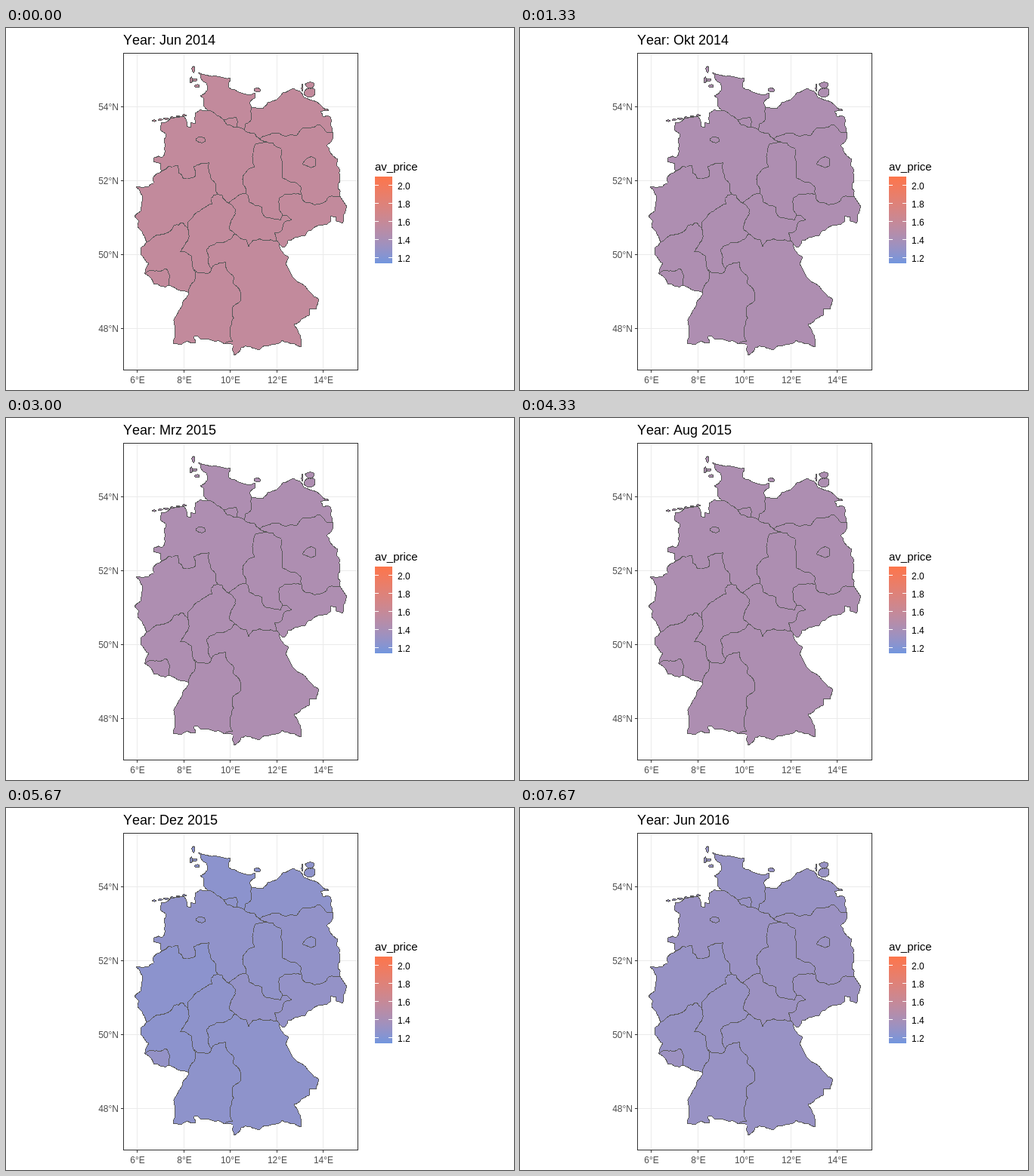
These frames come from a looping animation (672 px wide and 480 px high, 8000 ms). An HTML page:

```html
<!DOCTYPE html>
<html lang="en">
<head>
<meta charset="utf-8">
<title>Average price map</title>
<style>
  html, body { margin: 0; width: 100%; height: 100%; overflow: hidden; background: #fff; }
  svg { display: block; width: 672px; height: 480px; }
  text { font-family: "Liberation Sans", Arial, sans-serif; font-kerning: none; }
  .axis { font-size: 12px; fill: #4d4d4d; }
  .key { font-size: 12px; }
  .map { stroke: #595959; stroke-linejoin: round; }
  .map, .lines { shape-rendering: crispEdges; }
</style>
</head>
<body>
<svg id="stage" viewBox="0 0 672 480"></svg>
<script>
// Key points of each border between two junctions; ripple() roughens the stretches between them.
const arcs = {
  shW: '254,59 258,67 265,73 267,82 257,90 262,94 262,104 267,109',
  shN: '254,59 279,64 297,66 295,79 303,82 318,88 330,86 329,93 322,99 325,106',
  shNi: '267,109 277,114 288,122',
  shHh: '288,122 296,119 304,118 305,132',
  hhNi: '288,122 292,128 305,132',
  shNiE: '305,132 315,135',
  shMv: '325,106 325,121 317,127 315,135',
  mvN: '325,106 340,107 346,99 358,95 367,85 380,80 389,84 394,92 411,98 418,104 427,109 416,111 419,117 429,118 432,138',
  mvNi: '315,135 328,139 336,148',
  mvBb: '336,148 358,139 372,143 385,142 396,132 412,128 419,132 427,139 432,138',
  niBb: '336,148 345,151',
  bbE: '432,138 432,147 424,156 428,163 439,174 437,182 442,196 439,210 442,223',
  bbSt: '345,151 353,152 364,160 364,173 366,199 383,205 391,212 391,221',
  bbSn: '391,221 396,231 419,232 427,224 442,223',
  snE: '442,223 451,237 445,259 437,256 437,251 430,249 429,257 406,266 396,275 379,280 373,282 367,291 361,285',
  snBy: '357,282 361,285',
  stSn: '391,221 371,220 362,225 362,242 366,248',
  thSn: '366,248 378,254 367,260 365,268 355,272 357,282',
  stTh: '366,248 363,255 342,250 339,238 322,231 318,220',
  niTh: '318,220 305,224 294,232',
  niSt: '345,151 330,154 327,166 329,184 316,193 314,208 318,220',
  heNi: '280,220 286,222 294,232',
  heTh: '294,232 304,241 300,252 295,266 303,273',
  thBy: '303,273 318,281 321,290 327,281 344,281 357,282',
  heBy: '303,273 284,284 265,294 267,308 272,319',
  bwBy: '272,319 276,314 290,310 292,320 300,328 300,338 310,350 310,362 299,373 297,396 300,415 289,419',
  heBw: '248,320 257,325 267,326 272,319',
  rpBw: '248,320 249,336 242,351',
  rpHe: '240,265 241,280 230,297 245,302 248,320',
  rpNw: '186,284 200,274 212,272 222,262 234,258 240,265',
  heNw: '240,265 240,258 256,243 273,233 271,226 280,220',
  nwNi: '206,190 227,182 235,200 251,196 248,184 269,178 270,194 277,206 280,220',
  slRp: '184,326 192,321 212,319 216,332 216,341',
  byE: '361,285 366,297 374,304 370,313 379,330 394,341 402,350 414,360 411,373 402,372 401,381 381,393 389,407 391,415 390,423 382,419 365,414',
  byS: '365,414 361,418 342,421 335,427 323,422 311,424 302,434 300,420 289,419',
  bwS: '289,419 272,414 258,413 253,408 248,410 251,417 232,420 221,418 223,402 222,392 229,374 236,360 242,351',
  rpS: '242,351 227,347 216,341',
  slW: '216,341 206,343 196,340 184,326',
  rpW: '184,326 189,312 178,300 178,292 186,284',
  nwW: '186,284 180,270 174,263 176,256 170,249 178,243 180,230 172,211 188,211 195,206 194,200 206,190',
  niW: '206,190 205,180 195,178 196,172 207,171 211,155 211,140 205,136 205,126 222,119 236,118 239,130 244,132 245,125 251,127 250,113 256,109 267,109'
};

// A leading minus walks the arc backwards.
const states = {
  SH: 'shN shMv -shNiE -shHh -shNi -shW',
  HH: 'shHh -hhNi',
  MV: 'mvN -mvBb -mvNi -shMv',
  NI: 'niW shNi hhNi shNiE mvNi niBb niSt niTh -heNi -nwNi',
  BB: 'mvBb bbE -bbSn -bbSt -niBb',
  ST: 'bbSt stSn stTh -niSt',
  SN: 'bbSn snE -snBy -thSn -stSn',
  TH: 'stTh niTh heTh thBy -thSn',
  HE: 'heNi heTh heBy -heBw -rpHe heNw',
  NW: 'nwW nwNi -heNw -rpNw',
  RP: 'rpW rpNw rpHe rpBw rpS -slRp',
  SL: 'slW slRp',
  BW: 'heBw bwBy bwS -rpBw',
  BY: 'thBy snBy byE byS -bwBy -heBy'
};

// Small areas as rough ovals: centre and radii.
const ovals = {
  SH: [[248, 55, 2, 4], [250, 69, 3, 2], [245, 69, 2, 4], [253, 77, 3, 2], [332, 82, 5, 3]],
  MV: [[402, 76, 6, 4], [402, 86, 8, 6], [392, 79, 1, 4]],
  NI: Array.from({ length: 6 }, (_, i) => [196 + 8 * i, 123 - 1.4 * i, 3, 1]),
  HB: [[258, 148, 7, 4]],
  BE: [[402, 178, 9, 7]]
};

let seed = 7;
const random = () => (seed = seed * 16807 % 2147483647) / 2147483647;

// Midpoint displacement until the pieces are about three pixels long.
function ripple([x1, y1], [x2, y2]) {
  const [dx, dy] = [x2 - x1, y2 - y1];
  if (Math.hypot(dx, dy) < 5) return [[x2, y2]];
  const k = (random() - .5) * .3;
  const mid = [(x1 + x2) / 2 - dy * k, (y1 + y2) / 2 + dx * k];
  return [...ripple([x1, y1], mid), ...ripple(mid, [x2, y2])];
}

for (const name in arcs) {
  const keys = arcs[name].split(' ').map(p => p.split(',').map(Number));
  arcs[name] = keys.flatMap((p, i) => i ? ripple(keys[i - 1], p) : [p]);
}

const ring = pts => 'M' + pts.join('L') + 'Z';

const outline = list => ring(list.split(' ').flatMap(name =>
  name[0] === '-' ? [...arcs[name.slice(1)]].reverse() : arcs[name]));

const oval = ([x, y, rx, ry]) => ring(Array.from({ length: 9 }, (_, i) => {
  const [a, r] = [i * Math.PI * 2 / 9, .8 + random() * .4];
  return [x + rx * r * Math.cos(a), y + ry * r * Math.sin(a)];
}));

const shape = id => `<path id="${id}" d="${states[id] ? outline(states[id]) : ''}${(ovals[id] || []).map(oval).join('')}"/>`;

// Price scale
const low = 1.14, high = 2.1;
const color = price =>
  `color-mix(in lab, rgb(253, 117, 74) ${((price - low) / (high - low) * 100).toFixed(2)}%, rgb(113, 150, 222))`;

// National price at a few months, straight lines between.
const course = [[0, 1.57], [3, 1.53], [4, 1.435], [5, 1.335], [7, 1.3], [9, 1.435], [11, 1.49], [13, 1.43],
                [14, 1.37], [16, 1.33], [17, 1.26], [19, 1.205], [20, 1.275], [23, 1.31]];

// States drift apart as the price falls.
const lean = { TH: 1, SN: 1, SL: 1, BB: .7, ST: .5, BE: .5, NI: .4, HB: .4, SH: -.3, NW: -.3, RP: -.3 };

function priceAt(step, id) {
  const i = Math.max(1, course.findIndex(c => c[0] >= step));
  const [[s1, p1], [s2, p2]] = [course[i - 1], course[i]];
  const price = p1 + (p2 - p1) * (step - s1) / (s2 - s1);
  return price + (lean[id] || 0) * Math.max(0, 1.4 - price) * .2;
}

// Monthly labels from June 2014; April 2015 has no data.
const months = 'Jan Feb Mrz Apr Mai Jun Jul Aug Sep Okt Nov Dez'.split(' ');
function monthAt(step) {
  const m = 5 + step + (step > 9);
  return `${months[m % 12]} ${2014 + Math.floor(m / 12)}`;
}

const line = (x1, y1, x2, y2, c) => `<path d="M${x1},${y1}L${x2},${y2}" stroke="${c}"/>`;
const label = (x, y, s, anchor, cls) => `<text x="${x}" y="${y}" text-anchor="${anchor}" class="${cls}">${s}</text>`;

const ids = [...Object.keys(states), 'HB', 'BE'];
const xs = [6, 8, 10, 12, 14].map(d => [d, Math.floor(173.5 + (d - 6) * 30.75) + .5]);
const ys = [54, 52, 50, 48].map(d => [d, 104.5 + (54 - d) * 49]);
const keys = [2, 1.8, 1.6, 1.4, 1.2].map((v, i) => [v, 208.5 + i * 24]);
const stops = Array.from({ length: 13 }, (_, i) =>
  `<stop offset="${i / 12}" style="stop-color: ${color(low + (high - low) * i / 12)}"/>`).join('');

document.getElementById('stage').innerHTML = `
  <defs><linearGradient id="bar" x1="0" y1="1" x2="0" y2="0">${stops}</linearGradient></defs>
  <rect width="672" height="480" fill="#fff"/>
  <g class="lines" fill="none">
    ${xs.map(([, x]) => line(x, 33, x, 453, '#ebebeb') + line(x, 454, x, 457, '#333')).join('')}
    ${ys.map(([, y]) => line(155, y, 465, y, '#ebebeb') + line(152, y, 155, y, '#333')).join('')}
  </g>
  <g class="map">${ids.map(shape).join('')}</g>
  <rect class="lines" x="155.5" y="33.5" width="310" height="420" fill="none" stroke="#333"/>
  ${xs.map(([d, x]) => label(x + .5, 471, d + '°E', 'middle', 'axis')).join('')}
  ${ys.map(([d, y]) => label(149, y + 4.5, d + '°N', 'end', 'axis')).join('')}
  <text x="488" y="189" font-size="15">av_price</text>
  <rect x="488" y="197" width="23" height="115" fill="url(#bar)"/>
  <g class="lines">${keys.map(([, y]) => line(488, y, 493, y, '#fff') + line(506, y, 511, y, '#fff')).join('')}</g>
  ${keys.map(([v, y]) => label(518, y + 5.5, v.toFixed(1), 'start', 'key')).join('')}
  <text id="title" x="155" y="22" font-size="18"></text>`;

const loop = 8000, count = 24;
const starts = Array.from({ length: count }, (_, i) => Math.round(i * loop / count / 10) * 10);
const title = document.getElementById('title');
const paths = ids.map(id => document.getElementById(id));
let shown = -1;

function draw() {
  const t = performance.now() % loop;
  const step = starts.filter(s => s <= t).length - 1;
  if (step !== shown) {
    shown = step;
    title.textContent = 'Year: ' + monthAt(step);
    paths.forEach(p => { p.style.fill = color(priceAt(step, p.id)); });
  }
  requestAnimationFrame(draw);
}
draw();
</script>
</body>
</html>
```
